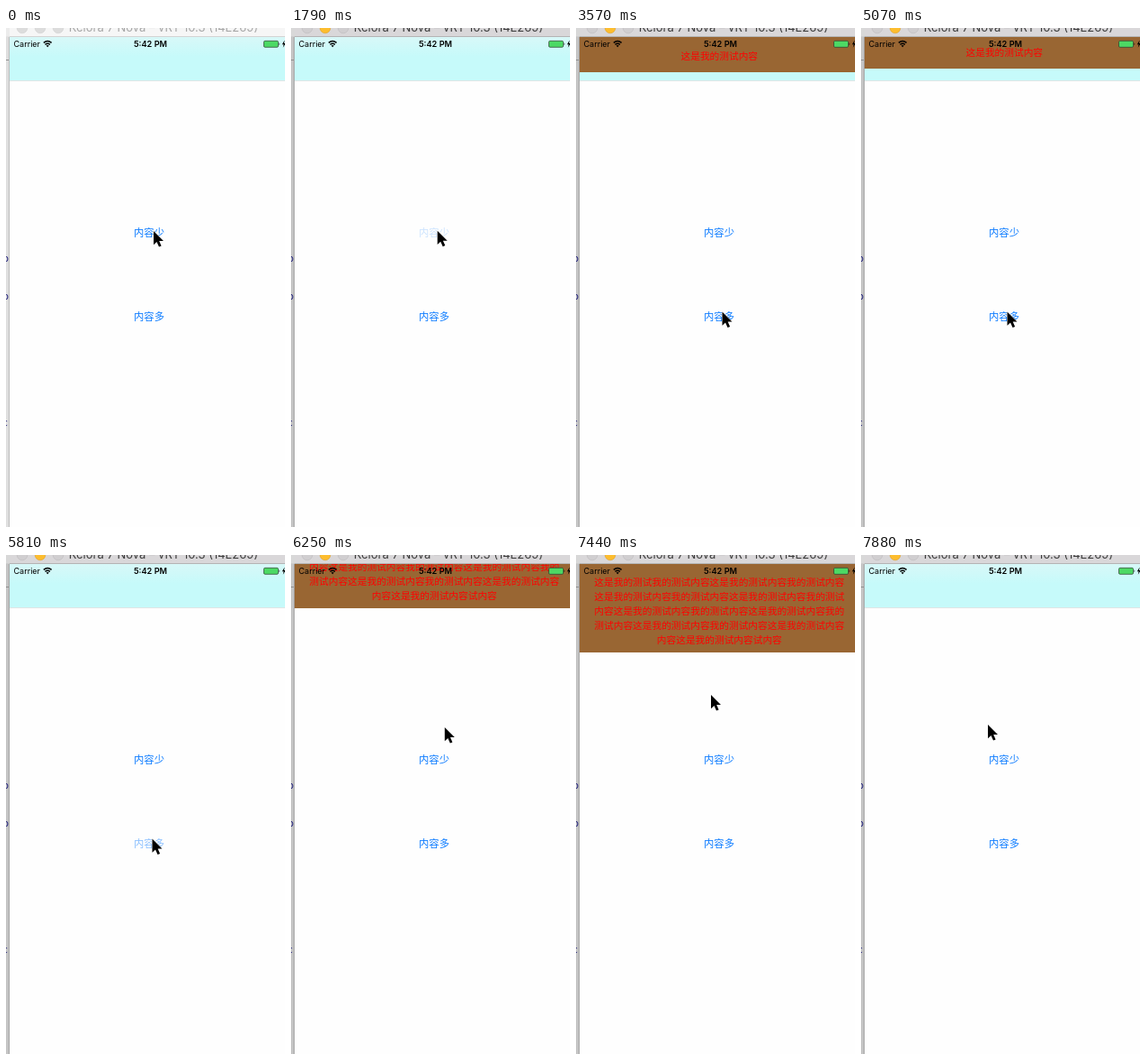
Recreate the animation shown at these times as an HTML page. Size 310 by 553 pixels, loop 8 s.

```html
<!DOCTYPE html>
<html lang="zh-CN">
<head>
<meta charset="utf-8">
<style>
html, body { margin: 0; width: 100%; height: 100%; overflow: hidden; background: #fff }
svg { display: block; width: 310px; height: 553px }
text { font: 10.7px "Noto Sans CJK SC", "Noto Sans CJK", sans-serif }
.mid { text-anchor: middle }
.button { font-size: 11.3px; fill: #0a7aff }
.banner { fill: #f00 }
.banner rect { fill: #963 }
.status text { font: 9px Inter, sans-serif }
.status .clock { font-weight: 600; font-size: 9.2px }
.title { font: 13px Inter, sans-serif }
.code text { font: 11px "DejaVu Sans Mono", monospace; fill: #1c1c78 }
</style>
</head>
<body>
<svg viewBox="0 0 310 553">
  <defs>
    <linearGradient id="nav" x2="0" y2="1">
      <stop stop-color="#d8f8f8"/><stop offset=".45" stop-color="#c6fafa"/>
    </linearGradient>
  </defs>

  <rect width="310" height="553" fill="#fefefe"/>
  <rect x="4" y="10" width="306" height="48" fill="url(#nav)"/>
  <path d="M4 58.5H310" stroke="#dfe6e6"/>
  <text class="button mid" id="few" x="159" y="231.3">内容少</text>
  <text class="button mid" id="many" x="159" y="324.3">内容多</text>

  <g class="banner mid" id="short"><rect x="4" y="10" width="306" height="39"/></g>
  <g class="banner mid" id="long"><rect x="4" y="10" width="306" height="98"/></g>

  <g class="status">
    <text x="8.5" y="21">Carrier</text>
    <text class="clock mid" x="160.5" y="21">5:42 PM</text>
    <g fill="none" stroke="#000" stroke-width="1.4">
      <path d="M41.8 16.4Q46.2 12.6 50.6 16.4M43.5 18.4Q46.2 16.2 48.9 18.4"/>
    </g>
    <path d="M44.6 19.5Q46.2 18.3 47.8 19.5L46.2 21.2Z"/>
    <rect x="286.5" y="14.3" width="16" height="7" rx="1.3" fill="#4cd964" stroke="#2b3a2e" stroke-width=".7"/>
    <path d="M303.6 16.3q1.2 1.5 0 3zM309.6 13.5l-2.8 4.7h1.8l-.8 3.6 3-4.9h-1.8z"/>
  </g>

  <rect id="edge" width="4" height="553"/>
  <path d="M0 35.5H3.5" stroke="#8e8e8e"/>
  <g class="code">
    <text x="-3.6" y="258.5">o</text>
    <text x="-3.6" y="300.5">o</text>
    <text x="-4.6" y="440.5">c</text>
  </g>
  <path id="rim" d="M3.5 10V553"/>
  <rect id="bar" x="4" width="306" height="9.5"/>
  <rect id="corner" width="4" height="9.5"/>
  <path id="barLine" d="M4 9.5H310"/>
  <g id="lights" stroke-width=".6">
    <circle cx="18" r="5.8"/><circle cx="38" r="5.8"/><circle cx="58" r="5.8"/>
  </g>
  <text class="title mid" id="title" x="175" y="4.3">Kelora 7 Nova – vRT 10.3 (14E269)</text>

  <path id="cursor" d="M0 0V15.2L3.5 12 6 17.6 8.6 16.4 6.2 11.1H11Z" stroke="#fff" stroke-width="1" stroke-linejoin="round" paint-order="stroke"/>
</svg>
<script>
const LOOP = 8000, STEP = 148.6;   // the screen refreshes once per STEP
const $ = id => document.getElementById(id);
const set = (id, attrs) => { for (const a in attrs) $(id).setAttribute(a, attrs[a]); };

const full = '这是我的测试内容', part = '我的测试内容';
const addLines = (id, y, lines) => lines.forEach((s, i) =>
  $(id).insertAdjacentHTML('beforeend', `<text x="159.3" y="${y + i * 16.1}">${s}</text>`));
addLines('short', 35, [full]);
addLines('long', 33.8, [
  '这是我的测试' + part + full + part,
  full + part + full + '我的测试',
  '内容' + full + part + full + '我的',
  '测试内容' + full + part + full,
  '内容' + full + '试内容'
]);

// Pointer tip: [step, x, y], held until the next entry
const path = [
  [0, 164, 225], [1, 162.7, 224.7],
  [20, 160, 240], [21, 158, 275], [22, 160, 310], [23, 161, 322.5], [24, 162.5, 314.5],
  [40, 166, 290], [41, 172, 220], [42, 170.8, 191],
  [45, 159, 143], [46, 154, 140],
  [50, 150, 155], [51, 143, 180], [52, 141, 189], [53, 141, 188]
];

const ease = x => .5 - .5 * Math.cos(Math.PI * Math.min(1, Math.max(0, x)));

function slide(id, height, k, show, hide) {
  const shown = ease((k - show) / 2.6) - ease((k - hide) / 1.2);
  set(id, {
    transform: `translate(0 ${Math.round(height * (shown - 1))})`,
    visibility: shown > .005 ? 'visible' : 'hidden'
  });
}

const press = (id, k, at) =>
  set(id, { opacity: k < at ? 1 : Math.min(1, .2 + (k - at) * .27) });

function paintWindow(active) {
  set('edge', { fill: active ? '#c4c4c4' : '#dedede' });
  set('rim', { stroke: active ? '#a6a6a6' : '#bdbdbd' });
  set('corner', { fill: active ? '#d8d8d8' : '#ececec' });
  set('bar', { fill: active ? '#d9d7d9' : '#f6f6f6' });
  set('barLine', { stroke: active ? '#b4b4b4' : '#d3d3d3' });
  set('title', { fill: active ? '#3c3c3c' : '#a6a6a6' });
  [...$('lights').children].forEach((c, i) => {
    const on = active && i == 1;
    c.setAttribute('fill', on ? '#fdbd2e' : active ? '#d0ced0' : '#dcdcdc');
    c.setAttribute('stroke', on ? '#e0a028' : active ? '#bcbabc' : '#cfcfcf');
  });
}

function draw(now) {
  const k = Math.floor(now % LOOP / STEP);
  paintWindow(k >= 12);
  press('few', k, 12);
  press('many', k, 38);
  slide('short', 39, k, 15.93, 33.752);
  slide('long', 98, k, 40.7, 51.752);
  const [, x, y] = path.filter(p => p[0] <= k).pop();
  set('cursor', { transform: `translate(${x} ${y})` });
}

const start = performance.now();
function tick() {
  draw(performance.now() - start);
  requestAnimationFrame(tick);
}
tick();
</script>
</body>
</html>
```
